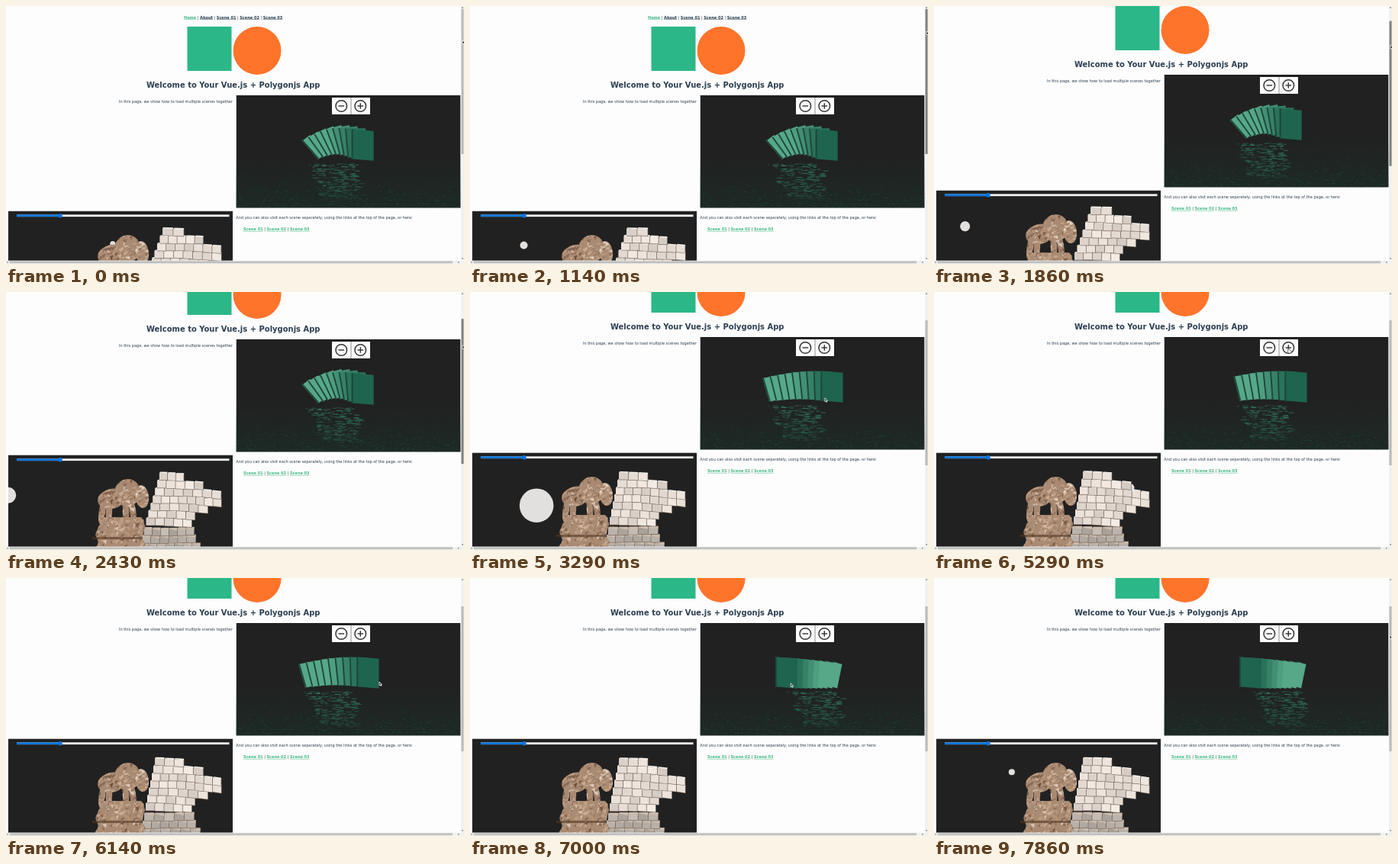
An HTML page with a canvas that plays this animation: 600x338 px, repeating every 8 s.

```html
<!DOCTYPE html>
<html lang="en">
<head>
<meta charset="utf-8">
<title>Multiple scenes</title>
<style>
html, body { margin: 0; width: 100%; height: 100%; overflow: hidden; background: #fdfdfd; }
canvas { display: block; width: 100vw; height: 100vh; }
</style>
</head>
<body>
<canvas id="stage" width="600" height="338"></canvas>
<script>
const ctx = document.getElementById('stage').getContext('2d');
const LOOP = 8000, BODY = 5;
const GREEN = '#42b983', INK = '#2c3e50';
const lerp = (a, b, u) => a + (b - a) * u;
const clamp = (v, lo = 0, hi = 1) => Math.max(lo, Math.min(hi, v));
const ramp = (t, from, to) => clamp((t - from) / (to - from));
const hash = n => { const s = Math.sin(n * 127.1 + 3.7) * 43758.5453; return s - Math.floor(s); };

// Keys are [time, ...values]; returns the values at t.
function track(keys, t) {
  const i = keys.findIndex(k => t < k[0]);
  if (i <= 0) return keys[i ? keys.length - 1 : 0].slice(1);
  const [t0, ...a] = keys[i - 1], [t1, ...b] = keys[i];
  return a.map((v, k) => lerp(v, b[k], (t - t0) / (t1 - t0)));
}

const scrollAt = t => 58 * ramp(t, 1290, 2500);

// The cursor drags the scrollbar, then travels between stops.
function mouseAt(t) {
  if (t < 2600) return [598, 33 + 12 * (1 - ramp(t, 500, 1000)) + .67 * scrollAt(t)];
  const stops = [[2600, 598, 72], [3290, 465, 139], [3700, 443, 78], [4800, 464, 74],
    [6140, 489, 136], [6950, 420, 138], [7700, 597, 75]];
  const i = stops.findIndex(s => t < s[0]);
  if (i < 1) return stops[stops.length - 1].slice(1);
  const [, ax, ay] = stops[i - 1], [end, bx, by] = stops[i];
  const u = ramp(t, Math.max(stops[i - 1][0], end - 700), end);
  return [lerp(ax, bx, u), lerp(ay, by, u)];
}

function rect(x, y, w, h, c) { ctx.fillStyle = c; ctx.fillRect(x, y, w, h); }
function disc(x, y, r, c) {
  ctx.fillStyle = c;
  ctx.beginPath();
  ctx.arc(x, y, r, 0, 7);
  ctx.fill();
}
function poly(p, c) {
  ctx.fillStyle = c;
  ctx.beginPath();
  for (let i = 0; i < p.length; i += 2) ctx.lineTo(p[i], p[i + 1]);
  ctx.closePath();
  ctx.fill();
}
function panel(x, y, w, h, paint) {
  ctx.save();
  ctx.beginPath();
  ctx.rect(x, y, w, h);
  ctx.clip();
  rect(x, y, w, h, '#212121');
  paint();
  ctx.restore();
}

// Text is laid out at ten times its size so advances stay fractional.
function text(s, x, y, size, color, bold, align = 'left') {
  ctx.save();
  ctx.translate(x, y);
  ctx.scale(.1, .1);
  ctx.font = (bold ? 'bold ' : '') + size * 10 + 'px "DejaVu Sans", sans-serif';
  ctx.textAlign = align;
  ctx.fillStyle = color;
  ctx.fillText(s, 0, 0);
  const w = ctx.measureText(s).width / 10;
  ctx.restore();
  return w;
}
function links(names, x, y, color, first = color) {
  names.forEach((name, i) => {
    if (i) x += text(' | ', x, y, BODY, INK);
    const c = i ? color : first;
    const w = text(name, x, y, BODY, c, true);
    rect(x, y + .6, w, .5, c);
    x += w;
  });
}

function button(x, plus) {
  rect(x, 120, 25, 22, '#fbfbfb');
  ctx.strokeStyle = '#333';
  ctx.lineWidth = 1.5;
  ctx.beginPath();
  ctx.arc(x + 12.3, 131, 7.3, 0, 7);
  ctx.stroke();
  rect(x + 8.5, 130.3, 7.6, 1.4, '#333');
  if (plus) rect(x + 11.6, 127.2, 1.4, 7.6, '#333');
}

const clicks = (t, first, gap) => clamp(Math.floor((t - first) / gap) + 1, 0, 3);

function water(t, cx) {
  const g = ctx.createLinearGradient(0, 196, 0, 264);
  g.addColorStop(0, 'rgba(26,46,40,0)');
  g.addColorStop(1, 'rgba(26,46,40,.6)');
  rect(301, 196, 295, 69, g);
  for (let i = 0; i < 900; i++) {
    const d = Math.sqrt(hash(i));
    const x = 301 + (hash(i + 1500) * 294 + t * .003 * (1 + d)) % 294;
    ctx.globalAlpha = d * (.2 + .4 * hash(i + 2900)) * (.75 + .25 * Math.sin(t / 220 + i));
    rect(x, 198 + d * 66, 1 + 2.5 * hash(i + 70), .8, '#2a5c4c');
  }
  for (let i = 0; i < 220; i++) {
    const d = hash(i + 40), y = 206 + d * 46;
    const x = cx + (hash(i + 210) * 2 - 1) * 34 * (1 - .3 * d) + 4 * Math.sin(t / 300 + y / 4) + 12 * d;
    ctx.globalAlpha = (.25 + .5 * hash(i + 330)) * (1 - .6 * d);
    rect(x - 3, y, 3 + 5 * hash(i + 610), 1.1, '#358067');
  }
  ctx.globalAlpha = 1;
}

// A row of squares seen from a turning camera; the two buttons change its length.
function fanScene(t) {
  const [yaw, curl] = track([[2700, .8, .72], [3290, 1, .28], [6200, 1, .28], [6950, -.75, -.2]], t);
  const front = 440 + 34 * yaw, back = 442 - 48 * yaw;
  const count = 9 - clicks(t, 3700, 200) + clicks(t, 4850, 280);
  water(t, lerp(front, back, .6 * (count - 1) / 8));
  for (let i = count - 1; i >= 0; i--) {
    const u = i / 8, w = lerp(29, 13, u), h = lerp(39, 32, u);
    const k = Math.min(1, u * 1.7);
    ctx.save();
    ctx.translate(lerp(front, back, u), 182 + 3 * u - 11 * Math.max(0, curl) * Math.sin(Math.PI * u));
    ctx.rotate(-curl * u);
    ctx.transform(1, .08, 0, 1, 0, 0);
    rect(-w / 2, -h / 2, w, h, `rgb(${lerp(31, 86, k)},${lerp(100, 168, k)},${lerp(78, 137, k)})`);
    rect(-w / 2, -h / 2, 1.8, h, '#1d4539');
    ctx.restore();
  }
  button(427, false);
  button(452, true);
  rect(451.6, 120, .8, 22, '#777');
}

// A ragged brick wall that bulges to the right and settles after a while.
function wall(t) {
  const settled = ramp(t, 1900, 3200), bend = lerp(.0004, .0008, settled);
  for (let i = 11; i >= 0; i--) {
    const left = lerp(205 - 3.5 * i, 195 - 2 * i, settled);
    const right = 222 + 3.6 * i + 54 * Math.exp(-(((i - 2.4) / 2) ** 2)) + 4 * (hash(i) - .5);
    const low = i > 6, n = Math.max(1, Math.round((right - left) / 12)), w = (right - left) / n;
    const lineY = x => lerp(291, 294, settled) + i * 9.9 + (low ? 3 : bend * (x - 190) ** 2);
    for (let j = 0; j < n; j++) {
      const x = left + j * w, end = x + w, bob = .5 * Math.sin(t / 500 + j + i);
      const y = lineY(x) + bob, yEnd = lineY(end) + bob;
      const c = (low ? 165 : 212) + hash(i * 17 + j) * 32;
      poly([x, y, end, yEnd, end, yEnd + 10, x, y + 10], '#7d6a5e');
      poly([x, y, end - .7, yEnd, end - .7, yEnd + 9.3, x, y + 9.3], `rgb(${c},${c - 8},${c - 16})`);
      poly([x, y, x + 1.5, y - 1.2, end, yEnd - 1.2, end - .7, yEnd + (low ? 3 : .6)], low ? '#cbbcae' : '#f5f1ec');
    }
  }
}

// Fills a path with bronze and breaks it up into lit and shaded chips.
function carve(path, top, bottom, seed) {
  ctx.save();
  ctx.fillStyle = '#a98a72';
  ctx.fill(path);
  ctx.clip(path);
  const tones = ['#6b4a36', '#d2b79d', '#efe0d0', '#8a6a52', '#c29f82'];
  for (let i = 0; i < 330; i++) {
    const r = k => hash(seed + i * 7 + k);
    const x = 106 + r(0) * 84, y = lerp(top, bottom, r(1)), w = 2 + 5 * r(2), h = 1 + 4 * r(3);
    ctx.globalAlpha = .3 + .5 * r(4);
    poly([x, y, x + w, y - h / 2, x + w * r(5), y + h], tones[i % 5]);
  }
  ctx.restore();
}

const bison = new Path2D();
function blob(x, y, rx, ry, tilt) {
  bison.moveTo(x, y);
  bison.ellipse(x, y, rx, ry, tilt, 0, 7);
}
blob(138, 326, 18, 13, -.25);
blob(159, 318, 17, 18, .3);
blob(178, 323, 9, 15, -.15);
for (let i = 0; i < 4; i++) blob(126 + 9 * i + (i > 1 ? 13 : 0), 342, 4.2, 17, .15 - .1 * i);

const rock = new Path2D();
const edge = y => 2.5 * Math.sin(y / 4) + 3 * hash(Math.round(y));
for (let y = 350; y <= 418; y += 4) rock.lineTo(121 - (y - 350) * .13 + edge(y), y);
for (let y = 418; y >= 350; y -= 4) rock.lineTo(182 - edge(y + 9), y);

function statue() {
  carve(rock, 348, 416, 40);
  rect(113, 376, 66, 3, 'rgba(82,55,38,.6)');
  rect(112, 392, 70, 4, '#d5bba2');
  rect(112, 396, 70, 3, '#6b4b37');
  carve(bison, 298, 360, 4000);
  ctx.strokeStyle = '#ead9c5';
  ctx.lineWidth = 1.3;
  ctx.beginPath();
  ctx.arc(174, 311, 5, -.4, 2.2);
  ctx.stroke();
}

// Perspective orbit: size and drop both follow from the depth.
function sphere(angle) {
  const a = angle * Math.PI / 180;
  const r = 1 / (.164 + .121 * Math.cos(a));
  disc(155 - 17.6 * Math.sin(a) * r, 306.5 + 1.4 * r, r, '#e1e0de');
}

function statueScene(t) {
  const angle = track([[0, 14], [1140, 73], [1860, 95], [3290, 170], [8000, 415]], t)[0] % 360;
  const near = angle > 90 && angle < 270;
  if (!near) sphere(angle);
  wall(t);
  statue();
  if (near) sphere(angle);
  rect(14, 273.3, 278.5, 2.8, '#eee');
  rect(14, 273.3, 57, 2.8, '#0a76dc');
  disc(71, 274.7, 2.7, '#0a76dc');
}

function scrollbars(scroll, held) {
  rect(596, 0, 4, 338, '#f1f1f1');
  rect(0, 333.5, 600, 4.5, '#f1f1f1');
  rect(596.5, 4 + scroll * .57, 3, 190, held ? '#808080' : '#b9b9b9');
  rect(5, 334.3, 580, 2.8, '#bfbfbf');
  for (const [x, y, turn] of [[598, 2, 0], [598, 331, 2], [2, 335.8, 3], [593, 335.8, 1]]) {
    ctx.save();
    ctx.translate(x, y);
    ctx.rotate(turn * Math.PI / 2);
    poly([-1.2, .7, 0, -.9, 1.2, .7], '#666');
    ctx.restore();
  }
}

function pointer(x, y, hand) {
  ctx.save();
  ctx.translate(x, y);
  if (hand) {
    poly([0, 0, 1.2, 0, 1.5, 2, 4, 2.6, 4, 5, 3, 6, .5, 6, -1, 3.5, 0, 3.5], '#fff');
  } else {
    poly([0, 0, 0, 4.8, 1.2, 3.8, 2, 5.5, 2.8, 5.1, 2, 3.5, 3.5, 3.4], '#111');
  }
  ctx.strokeStyle = hand ? '#222' : '#fff';
  ctx.lineWidth = hand ? .45 : .8;
  ctx.stroke();
  ctx.restore();
}

const SCENES = ['Scene 01', 'Scene 02', 'Scene 03'];
function draw(t) {
  const scroll = scrollAt(t);
  rect(0, 0, 600, 338, '#fdfdfd');
  ctx.save();
  ctx.translate(0, -Math.round(scroll));
  links(['Home', 'About', ...SCENES], 233, 16.8, INK, GREEN);
  rect(237.5, 27, 58, 58, '#2cb789');
  disc(329, 58.5, 31.5, '#ff742b');
  text('Welcome to Your Vue.js + Polygonjs App', 297.7, 107, 9.97, INK, true, 'center');
  text('In this page, we show how to load multiple scenes together', 297, 127.4, BODY, INK, false, 'right');
  panel(301.5, 117, 294, 147.5, () => fanScene(t));
  panel(3, 268.5, 294, 147, () => statueScene(t));
  text('And you can also visit each scene separately, using the links at the top of the page, or here:', 301.3, 279, BODY, INK);
  links(SCENES, 311, 294.3, GREEN);
  ctx.restore();
  scrollbars(scroll, t > 1140 && t < 2550);
  const [x, y] = mouseAt(t);
  pointer(x, y, x > 430 && x < 475 && y < 90);
}

const start = performance.now();
function tick() {
  draw((performance.now() - start) % LOOP);
  requestAnimationFrame(tick);
}
tick();
</script>
</body>
</html>
```
